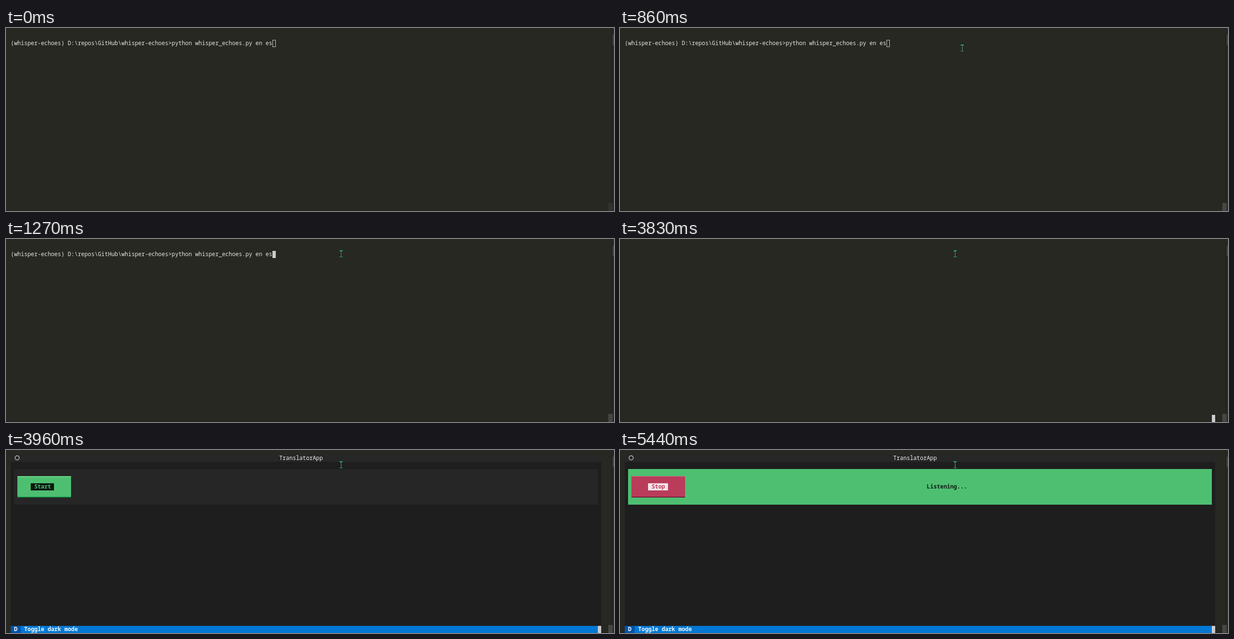
An HTML page with a canvas for the animation above (8000 ms loop, 1280 px wide and 385 px high).

```html
<!DOCTYPE html>
<html lang="en">
<head>
<meta charset="utf-8">
<title>Terminal session</title>
<style>
  html, body { margin: 0; width: 100%; height: 100%; overflow: hidden; background: #272822; }
  canvas { display: block; }
</style>
</head>
<body>
<canvas id="stage" width="1280" height="385"></canvas>
<script>
const ctx = document.getElementById("stage").getContext("2d");
const LOOP = 8000, LEFT = 10, TOP = 10, CELL = 7.065, ROW = 15;
const FONT = `${CELL / 0.6}px "Noto Sans Mono", "DejaVu Sans Mono", monospace`;
const TERMINAL = "#272822", TEXT = "#e6e6e4", CARET = "#cccccc";
const GREEN = "#4ebf71", RED = "#ba3c5b";

const PROMPT = "(whisper-echoes) D:\\repos\\GitHub\\whisper-echoes>python whisper_echoes.py en es";
const GREETING = [
  "pygame 2.5.2 (SDL 2.28.3, Python 3.11.6)",
  "Hello from the pygame community. https://www.pygame.org/contribute.html"
];

// Mouse path: time, x, y
const MOUSE = [
  [200, 960, 330], [260, 885, 180], [320, 859, 131], [510, 859, 131],
  [860, 720, 42], [1000, 704, 25], [1140, 705, 31]
];

const colX = col => Math.floor(LEFT + col * CELL);
const rowY = row => TOP + row * ROW;

function rect(x, y, w, h, color) {
  ctx.fillStyle = color;
  ctx.fillRect(x, y, w, h);
}

function cells(col, row, cols, rows, color) {
  const x = colX(col);
  rect(x, rowY(row), colX(col + cols) - x, rows * ROW, color);
}

function write(text, col, row, color = TEXT, weight = 500) {
  ctx.font = `${weight} ${FONT}`;
  ctx.fillStyle = color;
  ctx.fillText(text, LEFT + col * CELL, rowY(row) + 11);
}

function caret(col, row) {
  cells(col, row, 1, 1, CARET);
}

function hollowCaret(col, row) {
  ctx.strokeStyle = CARET;
  ctx.lineWidth = 1;
  ctx.strokeRect(colX(col) + 0.5, rowY(row) + 0.5, 6, 14);
}

function button(label, col, face, top, bottom, plate, ink) {
  cells(2, 3, 16, 3, face);
  const x = colX(2), w = colX(18) - x;
  rect(x, rowY(3), w, 1.5, top);
  rect(x, rowY(6) - 1.5, w, 1.5, bottom);
  cells(col, 4, label.length + 2, 1, plate);
  write(label, col + 1, 4, ink, 700);
}

function drawShell(t) {
  write(PROMPT, 0, 1);
  if (t < 1270) hollowCaret(78, 1);
  else if (t < 1950) caret(78, 1);
  else if (t < 2290) caret(0, 2);
  else {
    GREETING.forEach((line, i) => write(line, 0, 2 + i));
    caret(0, 4);
  }
}

function drawApp(t) {
  const pressed = t < 5440 && t >= 5370;
  const listening = t >= 5440;

  cells(0, 0, 176, 1, "#272727");
  cells(0, 1, 176, 23, "#1e1e1e");
  ctx.strokeStyle = "#e0e0e0";
  ctx.lineWidth = 1.2;
  ctx.beginPath();
  ctx.arc(23.5, 16.5, 4.4, 0, Math.PI * 2);
  ctx.stroke();
  write("TranslatorApp", 80, 0, "#f0f0f0");

  cells(1, 2, 174, 5, listening ? GREEN : "#262626");
  if (listening) {
    button("Stop", 7, RED, "#d2506f", "#5c1029", "#f5e4e8", RED);
    write("Listening...", 90, 4, "#0e2014", 700);
  } else if (pressed) {
    button("Start", 6, "#3f8e58", "#2a6a40", "#5fae78", "#101812", "#3f9a5c");
  } else {
    button("Start", 6, GREEN, "#7ae998", "#008139", "#0a180e", GREEN);
  }

  cells(0, 24, 176, 1, "#0178d4");
  cells(0, 24, 3, 1, "#0053aa");
  write("D", 1, 24, "#ffffff", 700);
  write("Toggle dark mode", 4, 24, "#f2f8fd", 600);
  if (pressed) caret(18, 5);
  else caret(175, 24);
}

function drawFrame(t) {
  rect(0, 384, 1275, 1, "#20201c");
  rect(1275, 0, 2, 385, "#1f201b");
  rect(1277, 0, 3, 385, "#2b2c27");
  rect(1277, 14, 3, 22, "#454641");
  rect(1268, 368, 9, 17, t < 260 ? "#32332e" : "#464743");
}

function mouseAt(t) {
  const step = t < 580 ? t : 580 + Math.floor((t - 580) / 70) * 70;
  const next = MOUSE.findIndex(p => p[0] > step);
  if (next < 0) return MOUSE[MOUSE.length - 1].slice(1);
  const [t0, x0, y0] = MOUSE[next - 1];
  const [t1, x1, y1] = MOUSE[next];
  // The pointer enters in three discrete jumps.
  const k = t < 580 ? 0 : (step - t0) / (t1 - t0);
  return [Math.round(x0 + (x1 - x0) * k), Math.round(y0 + (y1 - y0) * k)];
}

function drawMouse(t) {
  if (t < 200) return;
  const [x, y] = mouseAt(t);
  rect(x - 1, y - 6, 3, 12, "#151713");
  rect(x - 3, y - 7, 7, 1.4, "#2fd39d");
  rect(x, y - 6, 1, 12, "#7fb5a0");
  rect(x - 3, y + 6, 7, 1, "#25a47b");
}

function draw(now) {
  const t = now % LOOP;
  rect(0, 0, 1280, 385, TERMINAL);
  drawFrame(t);
  if (t < 3830) drawShell(t);
  else if (t < 3960) caret(175, 24);
  else drawApp(t);
  drawMouse(t);
}

const start = performance.now();
function tick() {
  draw(performance.now() - start);
  requestAnimationFrame(tick);
}
tick();
</script>
</body>
</html>
```
